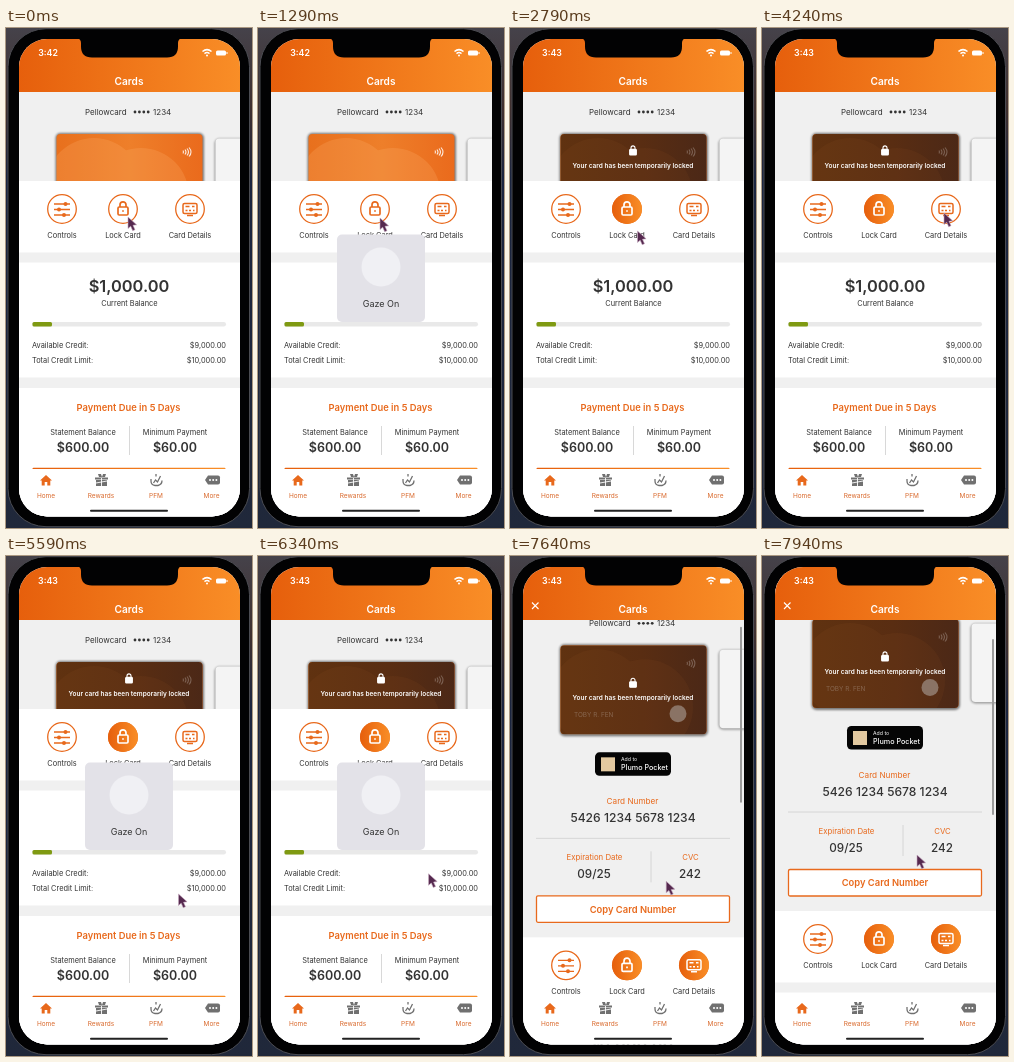
Recreate the animation shown at these times as an HTML page. Size 246 px wide and 500 px high, loop 7990 ms.

```html
<!DOCTYPE html>
<html lang="en">
<head>
<meta charset="utf-8">
<title>Card controls</title>
<style>
html, body { margin: 0; width: 100%; height: 100%; overflow: hidden; background: #10182a; }
svg { display: block; width: 100vw; height: 100vh; }
text { font-family: Inter, Roboto, sans-serif; fill: #333; }
.c { text-anchor: middle; }
.e { text-anchor: end; }
.b { font-weight: 600; }
.m { font-weight: 500; }
.s { font-size: 7.4px; }
.o { fill: #e8691c; }
.w { fill: #fff; }
.line { fill: none; stroke: #e8691c; stroke-width: 1.3; }
.rule { stroke: #cfcfcf; stroke-width: .8; }
.tab { font-size: 6.5px; fill: #d9692c; text-anchor: middle; }
</style>
</head>
<body>
<svg viewBox="0 0 246 500" preserveAspectRatio="none">
<defs>
  <linearGradient id="orange"><stop stop-color="#e65f0c"/><stop offset="1" stop-color="#f98e27"/></linearGradient>
  <linearGradient id="cardFill"><stop stop-color="#e8701d"/><stop offset=".5" stop-color="#ee7f2a"/><stop offset="1" stop-color="#ea6a1c"/></linearGradient>
  <linearGradient id="lockedFill"><stop stop-color="#603210"/><stop offset=".55" stop-color="#592d12"/><stop offset="1" stop-color="#4b2817"/></linearGradient>
  <linearGradient id="desk" x2="0" y2="1"><stop stop-color="#45424a"/><stop offset=".16" stop-color="#40302f"/><stop offset=".3" stop-color="#1b2540"/><stop offset="1" stop-color="#20283a"/></linearGradient>
  <clipPath id="screen"><rect x="13" y="11" width="221" height="477.5" rx="28"/></clipPath>
  <clipPath id="cardShape"><rect x="50.5" y="106" width="146" height="89" rx="4"/></clipPath>
  <filter id="soft" x="-20%" y="-20%" width="140%" height="140%"><feGaussianBlur stdDeviation="1.3"/></filter>
  <g id="padlock">
    <rect x="-5" y="-1.5" width="10" height="8" rx="1.2"/>
    <path d="M-3 -1.5v-2.2a3 3 0 0 1 6 0v2.2M0 1.7v1.6"/>
  </g>
  <g id="cardIcon">
    <rect x="-7" y="-5.5" width="14" height="10" rx="1.5"/>
    <path d="M-4.5 -2.5h4M2 -2.5h2.5M-4.5 1.5h2M-1 1.5h2M3 1.5h1.5M-3 6.5h6"/>
  </g>
</defs>

<rect width="246" height="500" fill="url(#desk)"/>
<rect x="2" y=".7" width="241.5" height="498" rx="38" fill="#020203" stroke="#4b4c52" stroke-width="1"/>

<g clip-path="url(#screen)">
  <rect x="12" y="10" width="223" height="480" fill="#fff"/>

  <g id="page">
    <rect x="12" y="60" width="223" height="345" fill="#f0f0f0"/>
    <text x="79" y="87" font-size="8">Pellowcard</text>
    <g fill="#333"><circle cx="129" cy="84" r="1.4"/><circle cx="133.4" cy="84" r="1.4"/><circle cx="137.8" cy="84" r="1.4"/><circle cx="142.2" cy="84" r="1.4"/></g>
    <text x="147" y="87" font-size="8">1234</text>

    <rect x="49.500" y="105" width="148.500" height="92" rx="5" opacity=".5" filter="url(#soft)"/>
    <rect x="208.500" y="110.500" width="40" height="80" rx="5" opacity=".35" filter="url(#soft)"/>
    <rect x="209.500" y="110.500" width="40" height="78.500" rx="4" fill="#f4f4f4"/>
    <g clip-path="url(#cardShape)">
      <rect x="50" y="106" width="148" height="89" fill="url(#cardFill)"/>
      <g fill="#ffb873" opacity=".22"><circle cx="88" cy="158" r="48"/><circle cx="135" cy="168" r="48"/></g>
      <g id="lockedCard">
        <rect x="50" y="106" width="148" height="89" fill="url(#lockedFill)"/>
        <g fill="#9a5a28" opacity=".1"><circle cx="88" cy="158" r="48"/><circle cx="135" cy="168" r="48"/></g>
        <g id="notice">
          <text class="c b w" x="123" y="140" font-size="6.500">Your card has been temporarily locked</text>
          <g transform="translate(123 122.500) scale(.75)" fill="#fff" stroke="#fff" stroke-width="1.400"><rect x="-4.500" y="-1.500" width="9" height="7.500" rx="1"/><path d="M-2.700 -1.500v-2a2.700 2.700 0 0 1 5.400 0v2" fill="none"/></g>
        </g>
      </g>
      <path id="waves" d="M177 122.500q1 1.500 0 3M179 121.500q2 2.500 0 5M181 120.500q3 3.500 0 7M183 119.500q4 4.500 0 9" fill="none" stroke="#fff" stroke-width="1.100"/>
      <text x="64" y="178" font-size="6.400" style="fill:#87664f">TOBY R. FEN</text>
      <circle cx="168" cy="174.500" r="8.500" fill="#8a7365"/>
    </g>

    <g id="details">
      <rect x="85" y="213" width="76" height="23.500" rx="4.500" fill="#050505"/>
      <rect x="91" y="218" width="14" height="14" fill="#e3c9a0"/>
      <text class="w" x="111" y="222" font-size="5.200">Add to</text>
      <text class="w m" x="111" y="231" font-size="7.200">Plumo Pocket</text>
      <text class="c o" x="122.500" y="265" font-size="8.200">Card Number</text>
      <text class="c m" x="123" y="282.500" font-size="12.100">5426 1234 5678 1234</text>
      <path class="rule" d="M26 299H220M141 312v31"/>
      <text class="c o" x="84.500" y="321" font-size="7.800">Expiration Date</text>
      <text class="c o" x="180.500" y="321" font-size="7.800">CVC</text>
      <text class="c m" x="84" y="338.500" font-size="11.700">09/25</text>
      <text class="c m" x="180" y="338.500" font-size="11.700">242</text>
      <rect class="line" x="26.500" y="356.500" width="193" height="26.500" rx="1.500" style="fill:#fff"/>
      <text class="c b o" x="123" y="373.200" font-size="9.400">Copy Card Number</text>
    </g>

    <g id="lower">
      <rect x="12" y="153" width="223" height="400" fill="#fff"/>
      <path d="M12 224.500h223v10H12zM12 349.500h223v10.500H12z" fill="#f0f0f0"/>

      <g class="line">
        <circle cx="56" cy="181" r="14.300"/>
        <path d="M48 176h16M48 181.500h16M48 187h16"/>
        <g fill="#e8691c" stroke="none"><circle cx="59.500" cy="176" r="2"/><circle cx="53" cy="181.500" r="2"/><circle cx="58" cy="187" r="2"/></g>
        <circle cx="117" cy="181" r="14.300"/><use href="#padlock" x="117" y="180.500" stroke-width="1.700"/>
        <circle cx="184" cy="181" r="14.300"/><use href="#cardIcon" x="184" y="181" stroke-width="1.500"/>
      </g>
      <g id="lockOn"><circle cx="117" cy="181" r="15" fill="url(#orange)"/><use href="#padlock" x="117" y="180.500" fill="none" stroke="#fff" stroke-width="1.700"/></g>
      <g id="detailsOn"><circle cx="184" cy="181" r="15" fill="url(#orange)"/><use href="#cardIcon" x="184" y="181" fill="none" stroke="#fff" stroke-width="1.500"/></g>
      <text class="c s" x="56" y="209.500">Controls</text>
      <text class="c s" x="117" y="209.500">Lock Card</text>
      <text class="c s" x="184" y="209.500">Card Details</text>

      <text class="c b" x="123" y="264" font-size="16.400">$1,000.00</text>
      <text class="c s" x="123.500" y="278">Current Balance</text>
      <rect x="26" y="294" width="194" height="4.500" rx="2.200" fill="#e9e9e9"/>
      <rect x="26.500" y="294" width="19.500" height="4.500" rx="1.500" fill="#7f9a12"/>
      <text class="s" x="26" y="319.500">Available Credit:</text><text class="s e" x="220" y="319.500">$9,000.00</text>
      <text class="s" x="26" y="334.500">Total Credit Limit:</text><text class="s e" x="220" y="334.500">$10,000.00</text>

      <text class="c b o" x="122.500" y="383" font-size="9.400">Payment Due in 5 Days</text>
      <text class="c s" x="77" y="407">Statement Balance</text><text class="c b" x="77" y="423.500" font-size="12.500">$600.00</text>
      <text class="c s" x="169" y="407">Minimum Payment</text><text class="c b" x="169" y="423.500" font-size="12.500">$60.00</text>
      <path class="rule" d="M123.500 398v29"/>
      <rect x="26.500" y="439.800" width="193" height="28" rx="1" fill="url(#orange)"/>
    </g>
  </g>
  <rect id="scrollbar" x="230" y="63" width="2" height="176" rx="1" fill="#9a9a9a"/>

  <rect x="12" y="10" width="223" height="54" fill="url(#orange)"/>
  <text class="c w b" x="123" y="56.800" font-size="10.100">Cards</text>
  <path id="close" d="M22 46.500l6.500 6.500M28.500 46.500l-6.500 6.500" stroke="#fff" stroke-width="1.100"/>
  <text id="clock" class="c w b" x="42" y="28" font-size="8.800"></text>
  <path d="M196.500 23.500q4.500-3.800 9 0M198.500 25.600q2.500-2 5 0" fill="none" stroke="#fff" stroke-width="1.500"/><circle cx="201" cy="27.500" r="1" fill="#fff"/>
  <rect x="210" y="22.500" width="10" height="5" rx="1.600" fill="#fff"/><path d="M221 24v2" stroke="#fff"/>

  <rect x="12" y="441" width="223" height="50" fill="#fff"/>
  <path d="M34 452.500l6-5.500 6 5.500h-1.700v5h-3v-3.500h-2.600v3.500h-3v-5z" fill="#e8691c"/>
  <path d="M90 452h11v6H90zM89 449.500h13v2H89zM92 446h3l1 3 1-3h3l-1 3h-6z" fill="#707070"/><path d="M95.500 450v8M90 455l11-2" stroke="#fff" stroke-width=".9"/>
  <path d="M145 451v2q0 4 4 4.500h3q4-1 4-5M147.500 455l2-3 2 2 3-6M150 446v2.500" fill="none" stroke="#707070" stroke-width="1.300"/>
  <path d="M202 447.500h10q2 0 2 2v5q0 2-2 2h-10l-3-4.500z" fill="#707070"/><g fill="#fff"><circle cx="204" cy="452" r="1"/><circle cx="207.200" cy="452" r="1"/><circle cx="210.400" cy="452" r="1"/></g>
  <text class="tab" x="40" y="469.500">Home</text><text class="tab" x="95" y="469.500">Rewards</text><text class="tab" x="150" y="469.500">PFM</text><text class="tab" x="205.500" y="469.500">More</text>
  <rect x="84" y="481.800" width="78" height="2" rx="1" fill="#222"/>

  <g id="scan">
    <rect x="79" y="206.500" width="88" height="87.500" rx="5" fill="#e3e2e8"/>
    <circle cx="123" cy="239" r="19.500" fill="#f0f0f4"/>
    <text class="c" x="123" y="279" font-size="9">Gaze On</text>
  </g>
</g>

<path d="M71 10h105q-4 1-4 5v3.500q0 11-11 11H86q-11 0-11-11v-3.500q0-4-4-5z" fill="#020203"/>
<path id="cursor" d="M0 0v11.500l2.700-2.300 2 4.500 2.300-1-2-4.400 3.600-.5z" fill="#55294f" stroke="#c7a9bf" stroke-width=".6"/>
</svg>
<script>
const LOOP = 7990;
const OPEN_HEIGHT = 245, SCROLL = 43, DRAG_START = 7450, DRAG_END = 7900;
const el = id => document.getElementById(id);
const ramp = (t, from, to) => {
  const x = Math.min(1, Math.max(0, (t - from) / (to - from)));
  return x * x * (3 - 2 * x);
};
const fade = (id, value) => el(id).setAttribute('opacity', value);
const move = (id, x, y) => el(id).setAttribute('transform', `translate(${x} ${y})`);

// Cursor moves: start, end, x, y; the last one drags the page
const moves = [[300, 1200, 122, 190], [2200, 2760, 127.5, 203], [3200, 4100, 182, 185],
  [4750, 5450, 172.5, 338], [6000, 6700, 168.5, 296], [6850, 7350, 157, 299 + SCROLL],
  [DRAG_START, DRAG_END, 155, 299]];

function cursorAt(t) {
  let x = 122, y = 189;
  for (const [from, to, endX, endY] of moves) {
    const k = ramp(t, from, to);
    x += (endX - x) * k;
    y += (endY - y) * k;
  }
  return [x, y];
}

function draw(t) {
  const locked = ramp(t, 2300, 2600);
  const open = ramp(t, 6490, 6887);
  const drag = ramp(t, DRAG_START, DRAG_END);
  const scan = ramp(t, 700, 900) - ramp(t, 2250, 2610) + ramp(t, 4600, 4800) - ramp(t, 6450, 6810);
  const revealed = Math.min(42, OPEN_HEIGHT * open);

  move('page', 0, -SCROLL * drag);
  move('lower', 0, OPEN_HEIGHT * open);
  move('notice', 0, revealed / 2); // stays centred in the visible part of the card
  move('scrollbar', 0, 20 * drag);
  move('cursor', ...cursorAt(t));
  fade('lockedCard', locked);
  fade('lockOn', locked);
  fade('waves', .85 - .6 * locked);
  fade('details', open);
  fade('detailsOn', open);
  fade('close', open);
  fade('scan', scan);
  fade('scrollbar', ramp(t, DRAG_START, DRAG_START + 100));
  el('clock').textContent = t < 2000 ? '3:42' : '3:43';
}

const start = performance.now();
function tick() {
  draw((performance.now() - start) % LOOP);
  requestAnimationFrame(tick);
}
tick();
</script>
</body>
</html>
```
